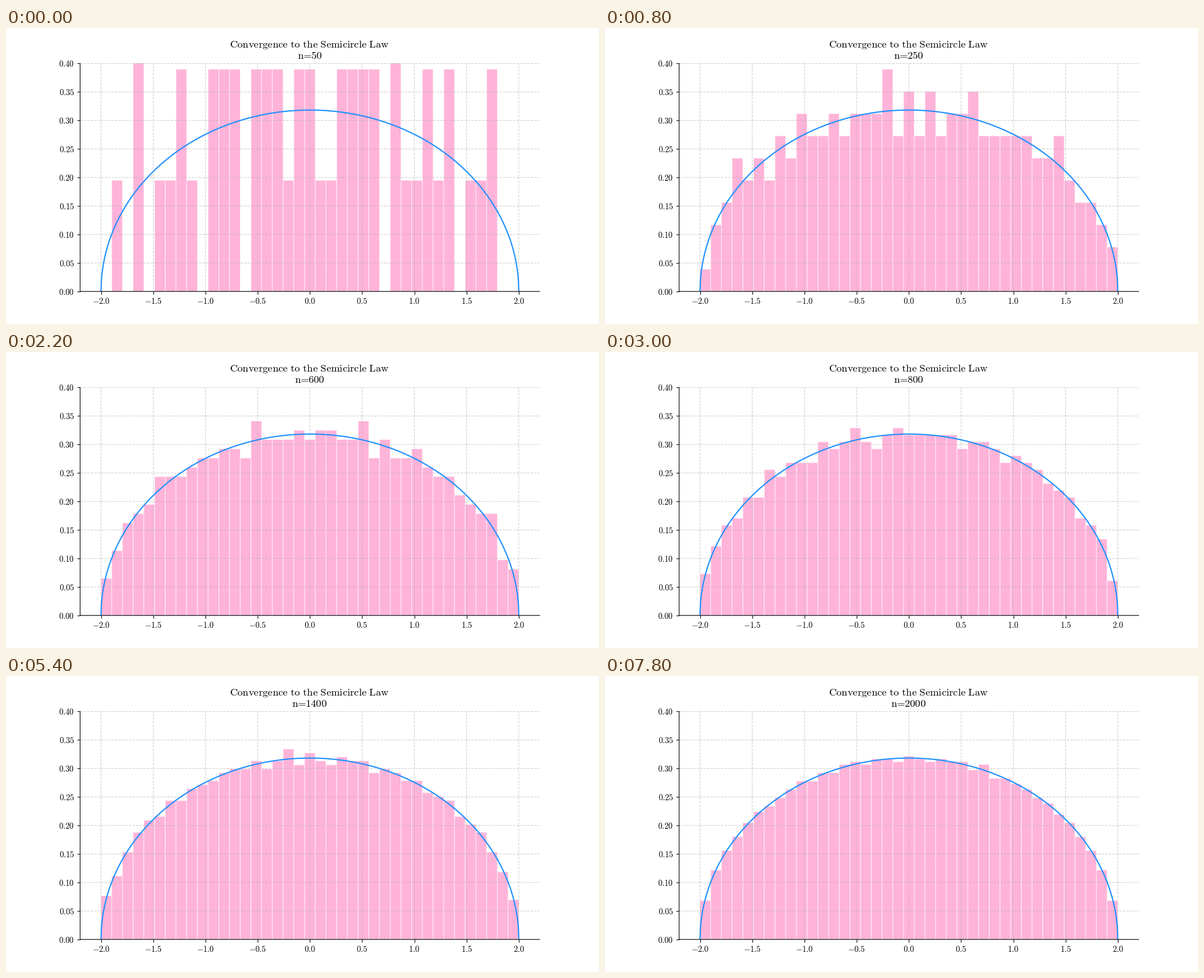
These frames come from a looping animation (1058 px wide and 529 px high, 8000 ms). A matplotlib script:

```python
import numpy as np
import matplotlib.pyplot as plt
from matplotlib.animation import FuncAnimation
from matplotlib.ticker import FuncFormatter

FRAMES, INTERVAL, STEP = 40, 200, 50
BINS = 39
EDGES = np.linspace(-2, 2, BINS + 1)
WIDTH = EDGES[1] - EDGES[0]

plt.rcParams["mathtext.fontset"] = "cm"


def density(x):
    return np.sqrt(np.maximum(4 - x**2, 0)) / (2 * np.pi)


def cdf(x):
    return 0.5 + x * density(x) / 2 + np.arcsin(x / 2) / np.pi


def heights(n):
    """Histogram of n eigenvalues: cumulative counts stay within about one of the law."""
    rng = np.random.default_rng(n)
    cum = np.round(n * cdf(EDGES) + rng.normal(0, 0.5, BINS + 1))
    cum[0], cum[-1] = 0, n
    cum = np.maximum.accumulate(np.clip(cum, 0, n))
    return np.diff(cum) / (n * WIDTH)


fig, ax = plt.subplots(figsize=(10, 5), dpi=105.8)
ax.set_xlim(-2.2, 2.2)
ax.set_ylim(0, 0.4)
ax.set_xticks(np.arange(-2, 2.1, 0.5))
ax.set_yticks(np.arange(0, 0.41, 0.05))
ax.xaxis.set_major_formatter(FuncFormatter(lambda v, _: f"${v:.1f}$"))
ax.yaxis.set_major_formatter(FuncFormatter(lambda v, _: f"${v:.2f}$"))
ax.spines[["top", "right"]].set_visible(False)
ax.grid(linestyle="--", alpha=0.6)

bars = ax.bar(EDGES[:-1], heights(STEP), WIDTH, align="edge",
              color="hotpink", edgecolor="white", alpha=0.5)
xs = np.linspace(-2, 2, 1000)
ax.plot(xs, density(xs), color="dodgerblue", lw=1.5)

# Keep straight lines at their true sub-pixel positions.
for line in [*bars, *ax.spines.values(), *ax.get_xgridlines(), *ax.get_ygridlines()]:
    line.set_snap(False)


def title_line(text, y):
    return fig.text(541.8, y, text, transform=None, ha="center", va="baseline", fontsize=12.7)


title_line(r"$\mathrm{Convergence\ to\ the\ Semicircle\ Law}$", 493.9)
size_line = title_line("", 474.3)


def update(i):
    n = STEP * (i + 1)
    for bar, h in zip(bars, heights(n)):
        bar.set_height(h)
    size_line.set_text(rf"$\mathrm{{n\hspace{{-0.22}}=\hspace{{-0.22}}{n}}}$")
    return [*bars, size_line]


anim = FuncAnimation(fig, update, frames=FRAMES, interval=INTERVAL,
                     init_func=lambda: update(0), repeat=True, repeat_delay=0)
plt.show()
```
